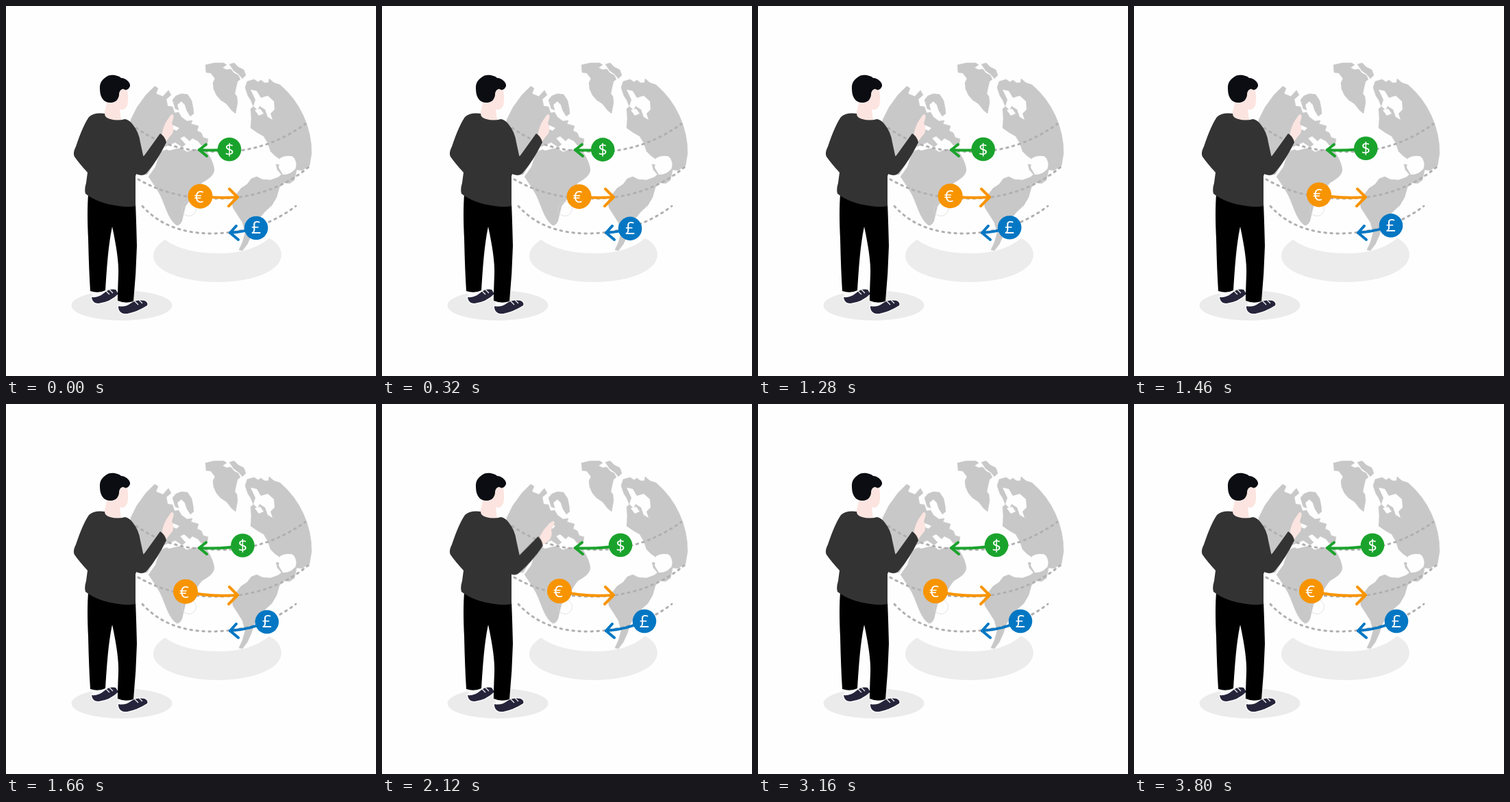
Write an HTML page that moves like this. It is 540 px wide and 540 px high and loops after 3.82 s.

```html
<!DOCTYPE html>
<html lang="en">
<head>
<meta charset="utf-8">
<title>Currency exchange</title>
<style>
  html, body { margin: 0; width: 100%; height: 100%; overflow: hidden; background: #fefefe; }
  svg { display: block; width: 100vw; height: 100vh; }

  .land { fill: #c8c8c8; stroke: #c8c8c8; stroke-width: .5; stroke-linejoin: round; }
  .sea { fill: #fefefe; }
  .orbit { fill: none; stroke: #b1afb2; stroke-width: 3; stroke-linecap: round; stroke-dasharray: 2.5 6.5; }
  .skin { fill: #fce5e1; }
  .cloth { fill: #333; }
  .shoe { fill: #25243a; stroke: #f8f8f8; stroke-width: 3; paint-order: stroke; }
  .lace { fill: none; stroke: #eee; stroke-width: 1.3; }

  /* Each transfer runs from the arrow tip (0) to the far coin position (1). */
  .line, .head { fill: none; stroke: var(--c); stroke-width: 4; stroke-linecap: round; stroke-linejoin: round; }
  .line { d: var(--p); stroke-dasharray: 1 2; animation: line 3820ms infinite; }
  .coin { offset-path: var(--p); offset-rotate: 0deg; animation: coin 3820ms infinite; }
  .coin circle { fill: var(--c); }
  .coin text { fill: #fff; font-family: "Open Sans", "Noto Sans", sans-serif; text-anchor: middle; }

  @keyframes coin {
    0% { offset-distance: calc(var(--near) * 85% + 15%); animation-timing-function: ease-out; }
    10.5%, 24.3% { offset-distance: calc(var(--near) * 100%); animation-timing-function: cubic-bezier(.5, 0, .4, 1); }
    51.31%, 100% { offset-distance: 100%; }
  }
  @keyframes line {
    0% { stroke-dashoffset: calc((1 - var(--near)) * .85); animation-timing-function: ease-out; }
    10.5%, 24.3% { stroke-dashoffset: calc(1 - var(--near)); animation-timing-function: cubic-bezier(.5, 0, .4, 1); }
    51.31%, 100% { stroke-dashoffset: 0; }
  }

  .arm { transform-origin: 234px 200px; animation: arm 3820ms ease-in-out infinite; }
  .hand { transform-origin: 234px 196px; animation: hand 3820ms ease-in-out infinite; }
  @keyframes arm {
    0%, 44.5% { transform: none; }
    56% { transform: translate(.5px, 8.5px) rotate(9deg); }
    70.7%, 100% { transform: none; }
  }
  @keyframes hand {
    0%, 44.5% { transform: none; }
    56% { transform: translate(-1px, 2px) rotate(3deg); }
    70.7%, 100% { transform: none; }
  }
</style>
</head>
<body>
<svg viewBox="0 0 540 540">
  <!-- bases -->
  <path fill="#ececec" d="M232 341Q215 352 215 365C215 386 257 403 309 403S402 386 402 363Q401 347 384 339Q358 361 310 361Q260 361 232 341Z"/>
  <ellipse fill="#ebebeb" cx="169" cy="437" rx="73.5" ry="22"/>

  <!-- globe -->
  <g class="land">
    <path d="M291 86L304 83 318 83 322 86 316 90 322 93 328 92 333 98 339 101 342 107 338 110 336 118 334 128 337 132 338 141 335 157 329 152 322 143 313 137 307 130 303 121 302 112 305 106 299 98 292 97Z"/>
    <path d="M326 85L333 83 339 89 347 93 350 101 345 106 340 100 332 94Z"/>
    <path d="M217 117L222 120 219 128 229 132 237 123 241 130 234 136 236 146 243 147 246 156 252 155 256 162 264 168 272 167 270 172 281 175 279 182 285 185 288 192 295 194 293 205 285 203 280 197 272 193 268 197 260 190 254 193 262 202 257 206 247 199 238 203 230 206 221 213 216 230 206 246 188 245 188 215 182 190 182 166 191 148 204 130Z"/>
    <path d="M243 137L248 131 256 128 265 129 271 138 273 148 274 157 269 161 264 153 261 144 256 139 250 144 252 152 247 150Z"/>
    <path d="M225 214C236 207 246 207 256 208L264 213 275 209 291 210C297 218 303 229 304 239C303 248 296 252 286 258C279 266 275 275 270 282L262 292Q259 304 257 313Q254 321 249 320C241 315 236 303 231 290Q226 275 216 261L208 249 218 235Z"/>
    <path d="M349 119L352 110 362 107 368 111 372 108 377 112 383 112 384 106 391 112 400 115A131 131 0 0 1 446 215L443 233 432 240 423 239 421 227 418 219 412 219 407 225 399 223 393 219 386 212 382 200 376 190 367 185 357 178 358 164 357 150 361 147 357 137 353 131Z"/>
    <path d="M394 231L404 232 411 237 419 234 424 240 421 254 414 259 404 258 396 251 402 246 396 239Z"/>
    <path d="M330 284L337 274 343 266 352 260 358 252 366 249 374 253 386 254 397 250 406 256 399 265 395 279 388 291 378 300 368 312 362 322 358 335 352 348 345 357 340 356 345 345 349 331 345 316 338 305 331 294Z"/>
  </g>
  <g class="sea">
    <path d="M357 122L366 124 372 134 382 131 391 139 392 151 386 157 389 166 382 162 378 151 370 146 367 152 361 146 364 137Z"/>
    <path d="M400 222Q411 216 420 221Q426 230 422 238Q414 247 404 246L398 236Z"/>
    <path d="M244 174L253 178 249 182 242 179Z"/>
    <path d="M363 152L371 150 376 157 369 160Z"/>
    <path d="M232 208L247 202 254 207 238 211Z"/>
  </g>
  <circle cx="267" cy="296" r="10.5" fill="none" stroke="#d8d8d8" opacity=".7"/>
  <g class="orbit">
    <path d="M190 178Q236 210 290 211.500Q370 220 437 172"/>
    <path d="M193 253Q240 280 300 281Q386 283 444 233"/>
    <path d="M199 292Q235 332 300 332Q372 331 423 292"/>
  </g>

  <!-- person -->
  <path fill="#fafafa" d="M125 414H142L144 424 127 432ZM165 429H184L185 440 167 446Z"/>
  <path class="shoe" d="M125 425Q135 426 143 419Q151 412 160 414L164 420Q152 432 135 434Q126 434 125 425Z"/>
  <path class="shoe" d="M164 438Q174 440 182 434Q190 428 202 430Q208 433 206 437Q192 446 177 449Q164 450 164 438Z"/>
  <path class="lace" d="M146 416L151 421M151 414L156 419M188 431L193 436M194 429L199 434"/>
  <path d="M120 275Q118 300 120 340Q121 385 123 416Q135 420 145 415C147 385 149 350 155 322C161 350 165 375 164 393Q163 415 163 430Q174 435 186 431Q190 390 191 350Q190 310 189 288Z"/>
  <path class="skin" d="M148 137L142 163Q156 170 168 166L166 151Q174 153 177 145Q180 133 176 119L163 122Z"/>
  <path class="cloth" d="M121 162Q129 155 144 157Q144 163 152 165Q162 168 174 165Q181 167 185 173Q194 184 196 199L201 222 189 248V292Q178 294 165 292Q134 288 116 274Q114 268 117 258L119 243Q107 230 100 220Q97 215 102 205Q112 175 121 162Z"/>
  <path fill="#0b0d12" d="M137 121C136 111 142 106 147 103C152 99 164 101 168 105C175 105 182 112 181 117C179 122 175 124 171 121C166 122 165 126 165 130C164 136 161 140 154 141C144 142 137 135 137 121Z"/>
  <g class="arm">
    <path class="skin hand" d="M227 191C228 182 231 173 235 167L240.500 159Q245 156 244.500 163L242 171Q246 177 243 186Q239 190 233 199Z"/>
    <path class="cloth" d="M225 186Q232 190 234 199Q222 224 206 243Q200 250 190 245L186 230 202 218Z"/>
  </g>

  <!-- transfers -->
  <g style="--c:#1aa32c; --near:.6; --p:path('M282 210Q319 212 348 206')">
    <path class="line" pathLength="1"/>
    <path class="head" d="M292 202L282 210 293 219"/>
    <g class="coin"><circle r="17.300"/><text y="8.500" font-size="24">$</text></g>
  </g>
  <g style="--c:#f79400; --near:.63; --p:path('M338 279Q295 282 259 273')">
    <path class="line" pathLength="1"/>
    <path class="head" d="M326 267L338 279 325 292"/>
    <g class="coin"><circle r="18"/><text x="-2" y="9" font-size="24">€</text></g>
  </g>
  <g style="--c:#0377c3; --near:.61; --p:path('M327 331Q357 329 383 317')">
    <path class="line" pathLength="1"/>
    <path class="head" d="M336 321L327 331 339 341"/>
    <g class="coin"><circle r="17.300"/><text y="8.500" font-size="25">£</text></g>
  </g>
</svg>
</body>
</html>
```
